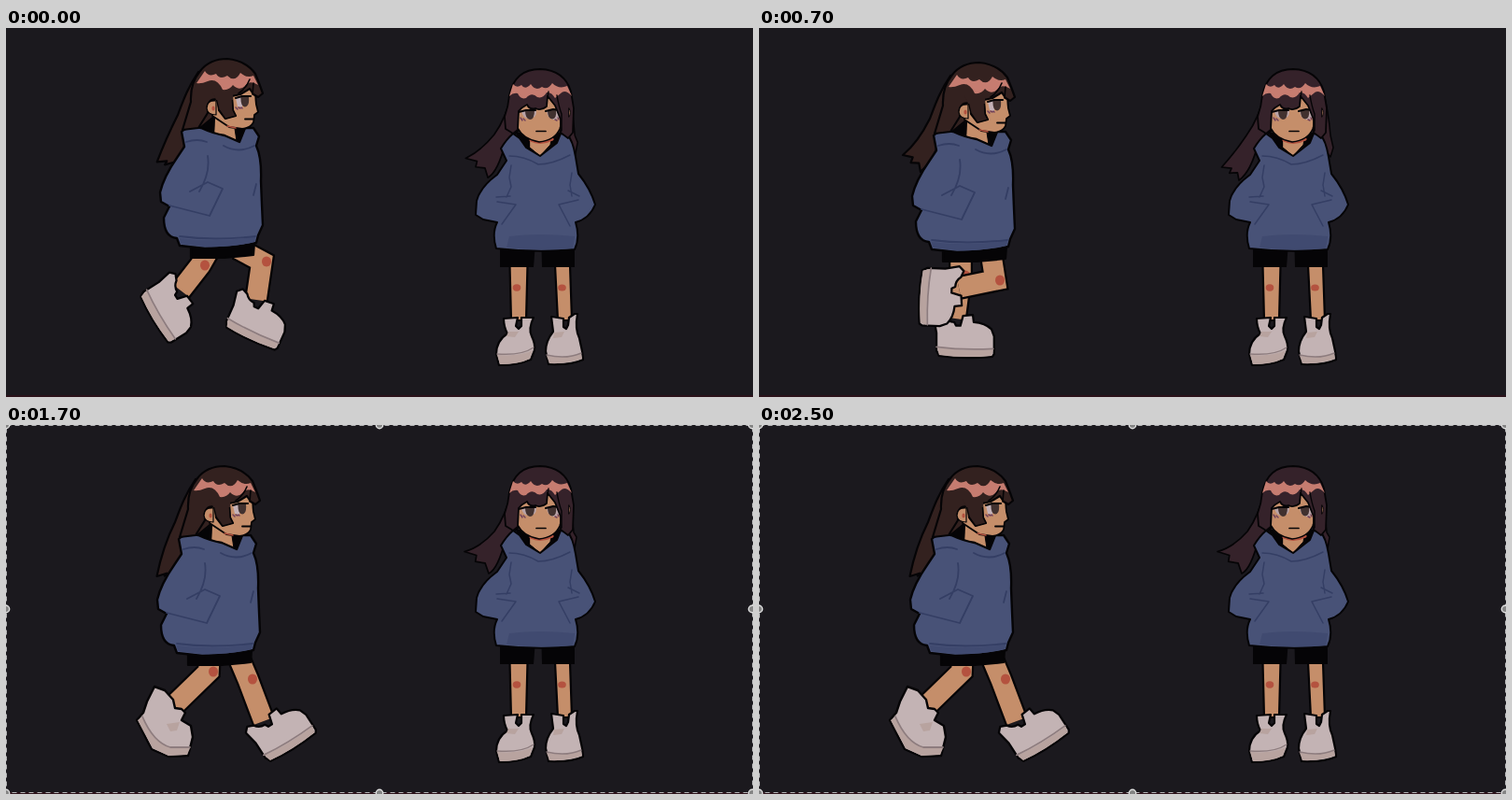
Recreate the animation shown at these times as an HTML page. Size 800 by 395 pixels, loop 2600 ms.

```html
<!DOCTYPE html>
<html lang="en">
<head>
<meta charset="utf-8">
<title>Walk cycle</title>
<style>
html, body { margin: 0; width: 100%; height: 100%; overflow: hidden; background: #1b191e; }
svg { display: block; width: 100vw; height: 100vh; }
</style>
</head>
<body>
<svg id="stage" viewBox="0 0 800 395" preserveAspectRatio="none" stroke-linejoin="round" stroke-linecap="round"></svg>
<script>
const INK = '#050406', SKIN = '#c58e6a', CLOTH = '#485277', FOLD = '#343e64', HEM = '#404a70';
const BOOT = '#c3b3b4', SOLE = '#b8a39f', SEAM = '#8d7c7e', RED = '#b4523f', SHINE = '#c67c70';
const HAIR = '#33211f', HAIR2 = '#35222a', IRIS = '#41312f', LASH = '#70405a';

const shape = (d, fill, w = 2.2, stroke = INK) =>
  `<path d="${d}" fill="${fill}" stroke="${stroke}" stroke-width="${w}"/>`;
const flat = (d, fill) => `<path d="${d}" fill="${fill}"/>`;
const line = (d, color = FOLD, w = 1.8) => shape(d, 'none', w, color);
const oval = (x, y, rx, ry, fill) => `<ellipse cx="${x}" cy="${y}" rx="${rx}" ry="${ry}" fill="${fill}"/>`;
const group = (transform, body) => `<g transform="${transform}">${body}</g>`;

// hip x y, knee x y, ankle x y, boot angle
const STEPS = [
  [248, 236, 274, 250, 268, 291, 24],
  [248, 246, 259, 272, 276, 317, -33],
  [238, 250, 252, 280, 246, 316, 0],
  [218, 238, 218, 268, 212, 314, 0],
  [222, 236, 210, 257, 189, 284, 58],
  [220, 246, 219, 267, 182, 303, 0],
  [222, 246, 219, 272, 168, 284, 82],
  [248, 238, 253, 270, 214, 278, 92]
];
// body shift per step
const BODY = [[3, -11], [0, 0], [0, 0], [0, -10], [2, -15], [1.5, -2], [2, -1], [2, -7]];

const bootShape = group('scale(.95)',
  shape('M-24,0L-19,-5L-12,-2Q-8,4 -1,4L1,8L6,8L9,-3L20,-4L21,4Q34,5 41,12L44,20V40L42,43Q10,46 -18,42L-21,36V16Z', BOOT, 2.4) +
  flat('M-20,33Q10,37 43,35L41,42Q10,45 -18,41Z', SOLE) +
  line('M-21,32Q10,36 43,34', SEAM));
const bentBoot =
  shape('M-21,-20L-10,-16L-1,-6L1,3L8,4L12,8L8,16L18,22L20,34L15,54L-6,55L-24,47L-40,16L-33,8L-29,-4Z', BOOT, 2.4) +
  flat('M-34,13L-39,16L-23,46L-6,54L14,53L17,46L-4,45Q-22,40 -34,13Z', SOLE) +
  flat('M-8,20L6,18L3,27L-4,28Z', SOLE) +
  line('M-34,12Q-22,40 -4,45L17,45', SEAM);

function leg(i) {
  const [hx, hy, kx, ky, ax, ay, turn] = STEPS[i];
  const d = `M${hx},${hy}L${kx},${ky}L${ax},${ay}`;
  const limb = (color, w) =>
    `<path d="${d}" fill="none" stroke="${color}" stroke-width="${w}" stroke-linejoin="miter" stroke-linecap="butt"/>`;
  return limb(INK, 26) + limb(SKIN, 21.5) +
    oval(kx + 5, ky, 5, 5.5, RED) +
    group(`translate(${ax} ${ay}) rotate(${turn})`, i === 5 ? bentBoot : bootShape);
}

// ragged end of the hair, from outer tip a to inner tip b
function tips([ax, ay], [bx, by]) {
  const at = (k, dx = 0, dy = 0) => `L${ax + (bx - ax) * k + dx},${ay + (by - ay) * k + dy}`;
  return `${ax},${ay}` + at(.3, 5, -3) + at(.45) + at(.7, 4, -4) + at(1);
}

const sideHoodie =
  shape('M195,244L263,241L262,254L231,257L195,257Z', INK) +
  flat('M204,119L224,104L254,118L248,134Z', INK) +
  shape('M221,102L241,112L244,132L220,124Z', SKIN, 1) +
  shape('M185,122Q192,115 206,118Q219,124 231,126L247,133L253,118L262,118L268,127L265,137Q271,150 270,175L271,200L272,222L267,233L265,241Q245,246 210,247L183,244L180,236Q166,235 166,214L172,202L163,197L162,187Q166,170 180,150L188,138Z', CLOTH, 2.4) +
  flat('M183,236Q220,241 264,235L263,240Q240,246 208,245L184,242Z', HEM) +
  line('M190,133Q202,129 212,133M230,137Q246,146 263,137M213,148Q216,166 204,186M194,186L213,176L229,183L215,212L172,201M262,190L265,178M183,234Q220,239 264,234');

const sideHead =
  shape('M218,90L242,70H264Q264,86 265,93L267,101L263,104L262,112Q259,118 250,119L236,117L218,105Z', SKIN, 1.8) +
  flat('M243,86L250,84V96L245,95Z', '#c4b2b8') +
  flat('M248.5,85H257Q258,95 253,95.5Q248,95 248.5,85Z', IRIS) +
  line('M243,86L250,84L259,84', INK, 2.2) +
  line('M243,96L245,98M246,96L248,97M249,96L250,97', LASH, 1.5) +
  line('M253,108.5H262', INK, 1.8) +
  line('M234,116L243,118', RED, 1.4) +
  shape('M195,90Q194,70 205,57Q215,44 234,44Q254,46 264,60L268,70L272,81L267,85L262,82L258,76Q253,79 248,82L239,84L240,99L243,105L232,108L225,99L224,88Q216,85 213,94L213,102L203,118L186,120Z', HAIR) +
  shape('M222,89Q212,88 212,97Q213,104 222,104Z', SKIN, 1.2) +
  oval(219, 97, 1.6, 2.6, RED) +
  shape('M221,82L239,82L240,99L243,105L232,108L225,98Z', HAIR, 1.2) +
  flat('M218,79L240,79V88H222Z', HAIR) +
  flat('M201,70L210,57Q214,64 222,60Q226,67 234,62Q242,70 248,59Q255,65 262,62L267,72Q258,66 253,73Q247,79 240,72Q236,78 229,77Q223,64 213,68Q206,71 201,70Z', SHINE) +
  line('M258,66Q254,76 246,81M262,70L261,82', INK, 1.6);

const walker = (p, c, s) => {
  const a = [152 + 9.5 * c, 148 + 14 * c + 5 * s], b = [171 + 9 * c, 161];
  const hair = shape(`M203,58C192,74 187,88 181,104Q168,130 ${tips(a, b)}Q186,148 190,130L222,104Z`, HAIR);
  return group('translate(-2 -3)', leg((p + 4) % 8)) + leg(p) +
    group(`translate(${BODY[p]})`, hair + sideHoodie + sideHead);
};

const frontBody =
  shape('M539.5,254H558.5L557,313H541Z', SKIN) +
  shape('M588,254H604L606,313H591Z', SKIN) +
  oval(547, 278, 4.3, 3.7, RED) + oval(595.5, 278, 4.3, 3.5, RED) +
  shape('M533,311L548,310L546,319L549,322L552,319V310H565Q559,322 563,330Q567,338 566,345L562,355Q548,361 528,361L525,349Q525,335 537,327Q533,320 533,311Z', BOOT) +
  shape('M584,309L597,311L597,320L600,322L602,318L603,310L609,306L612,306Q609,322 614,332L617,346L618,355Q606,361 581,360L578,346Q578,335 586,325Z', BOOT) +
  flat('M526,350Q550,352 564,345L561,354Q550,360 529,360Z', SOLE) +
  flat('M579,351Q600,354 616,349L617,354Q600,360 582,359Z', SOLE) +
  flat('M538,325H549L545,331L536,330ZM587,326L598,325L595,331L586,332Z', SOLE) +
  line('M526,349Q552,351 565,342M579,350Q600,355 616,348', SEAM, 1.5) +
  flat('M529,236H566.5L565,256H529ZM573.5,236H609V256H574Z', INK) +
  flat('M546,112H600L592,124L572,138L550,124Z', INK) +
  shape('M561,112H585L583,125L572,137L561,128Z', SKIN, 1) +
  line('M562,120Q573,125 585,119', RED, 3.2) +
  shape('M543,113Q536,119 530,129L536,142L526,157Q508,170 504,185L503,200L511,205L526,208Q520,220 525,236Q570,241 609,237Q615,224 610,208Q625,204 631,189Q626,172 613,156L610,138Q607,120 601,114L594,113L590,123L572,137L557,128L550,118Z', CLOTH, 2) +
  flat('M539,223Q570,219 609,223L607,236Q570,239 536,235Z', HEM) +
  line('M539,137Q555,137 570,146Q585,146 604,136M541,147L539,160L541,170L536,181M525,181L540,180M526,186L546,189L531,210M606,155L604,168L606,180M602,174L614,180M613,184L592,189L604,212', FOLD, 1.5);

const frontHead =
  shape('M545,75H596V98L593,108Q588,120 571,122Q554,119 548,107Z', SKIN, 1.6) +
  flat('M552,89H568Q568,97 560,97Q553,96 552,89ZM579,89H594Q593,99 586,98Q580,97 579,89Z', '#b9a3a6') +
  flat('M556,88H566Q566,98 561,98Q556,97 556,88ZM580,88H589Q590,97 585,97.5Q580,97 580,88Z', IRIS) +
  line('M549,90L557,88H567M578,89L586,87L594,88', INK, 2.2) +
  line('M551,96L553,99M554,97L556,99M588,98L590,99M591,96L592,98', LASH, 1.4) +
  line('M568,110.5H578', INK, 1.7) +
  shape('M540,111L535,108L534,95Q538,84 539,72Q545,44 572,44Q598,45 605,68L608,86L607,112L602,118L594,112L594,98Q590,88 588,83L580,73L579,84Q573,89 567,86Q561,88 558,82Q552,85 549,89L548,109L543,113Z', HAIR2, 1.8) +
  flat('M539,73L543,60Q547,65 552,61Q556,67 562,60Q567,68 574,63Q580,67 585,59Q592,66 601,62L606,73Q599,65 594,70L588,75Q584,68 579,69Q575,76 569,74Q563,68 557,75Q551,77 548,70Q543,69 539,73Z', SHINE) +
  line('M581,68L580,74M590,72Q592,84 595,92L595,110', INK, 1.4) +
  shape('M603,86Q606,91 603,95Z', SKIN, 1);

const stander = c => {
  const a = [495.5 - 4.5 * c, 149 - 13.5 * c], b = [514 + 3 * c, 163 - 4 * c];
  const rim = 612 - 4 * c;
  return shape(`M542,68Q536,96 ${522 + c},${115 - c}Q${510 - 2 * c},${133 - 2 * c} ${tips(a, b)}Q527,154 535,122L560,100Z`, HAIR2, 1.7) +
    shape(`M604,66Q${rim - 2},90 ${rim},115L${rim + 3},${128 - 8 * c}L${rim},138L598,120Z`, HAIR2, 1.5) +
    frontBody + frontHead;
};

const knobs = [[0, 0], [400, 0], [799, 0], [0, 197], [799, 197], [0, 394], [400, 394], [799, 394]];
const selection =
  '<rect x=".5" y=".5" width="799" height="393" fill="none" stroke="#b4b4b6" stroke-width="1" stroke-dasharray="5 4" stroke-linecap="butt"/>' +
  knobs.map(([x, y]) => `<circle cx="${x}" cy="${y}" r="3.7" fill="#858585" stroke="#e0e0e0" stroke-width="1.4"/>`).join('');

const stage = document.getElementById('stage');
const start = performance.now();
let shown = -1;

function draw(now) {
  const tick = Math.floor(Math.max(0, now - start) % 2600 / 100);
  if (tick !== shown) {
    shown = tick;
    const p = tick % 8, turn = (p - 1) * Math.PI / 4;
    const c = Math.cos(turn), s = Math.sin(turn);
    stage.innerHTML = '<rect width="800" height="395" fill="#1b191e"/>' +
      '<rect y="393" width="800" height="2" fill="#2a1119"/>' +
      walker(p, c, s) + stander(c) + (tick >= 12 ? selection : '');
  }
  requestAnimationFrame(draw);
}
draw(start);
</script>
</body>
</html>
```
